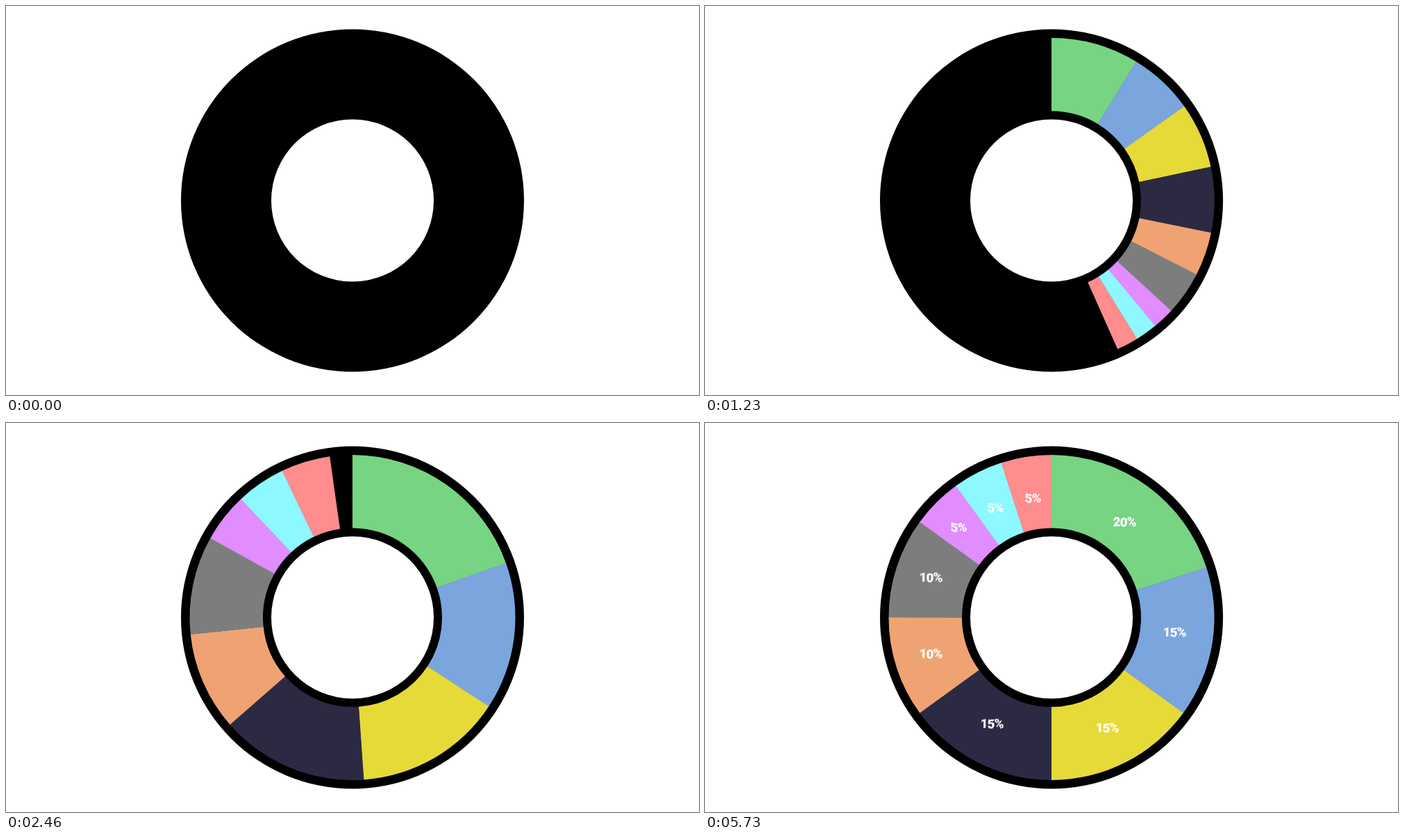
Write an HTML page with a canvas that moves like this. It is 998 px wide and 561 px high and loops after 6330 ms.

```html
<!DOCTYPE html>
<html lang="en">
<head>
<meta charset="utf-8">
<title>Donut chart</title>
<style>
  html, body { margin: 0; width: 100%; height: 100%; overflow: hidden; background: #fff; }
  canvas { display: block; }
</style>
</head>
<body>
<canvas id="stage" width="998" height="561"></canvas>
<script>
const ctx = document.getElementById('stage').getContext('2d');
const LOOP = 6330, STEP = 30, SWEEP = 2700, FADE = 1000;
const CX = 499, CY = 280.5;
const TOP = -Math.PI / 2, TURN = Math.PI * 2;

// share in percent, colour, label centre, start of the label's fade
const slices = [
  [20, '#77d482', 604, 142, 3030],
  [15, '#7ba5dd', 675.5, 300.5, 3230],
  [15, '#e6da38', 579, 439, 3400],
  [15, '#2c2a42', 412.5, 433, 3440],
  [10, '#efa372', 324.5, 332, 3630],
  [10, '#7d7d7d', 324.5, 222, 3750],
  [5, '#e18cff', 365, 150, 4000],
  [5, '#8df8ff', 417.5, 122, 4280],
  [5, '#ff8d8d', 472, 107.5, 4640]
].map(([share, color, x, y, start]) =>
  ({ share, color, x, y, start, label: makeLabel(share + '%') }));

function smooth(t) {
  t = Math.min(1, Math.max(0, t));
  return t * t * (3 - 2 * t);
}

function newLayer() {
  const layer = document.createElement('canvas');
  layer.width = 48;
  layer.height = 28;
  return layer;
}

// White text with a ragged outline: narrow columns shifted by a seeded jitter
function makeLabel(text) {
  const plain = newLayer(), rough = newLayer();
  const p = plain.getContext('2d'), r = rough.getContext('2d');
  p.font = '900 19px Roboto, "Open Sans", sans-serif';
  p.letterSpacing = '-1px';
  p.textAlign = 'center';
  p.fillStyle = '#fff';
  p.fillText(text, 24, 20.5);
  let seed = 7;
  for (let x = 0; x < 48; x += 2) {
    seed = (seed * 73 + 41) % 257;
    r.drawImage(plain, x, 0, 2, 28, x, seed / 257 * 1.6 - 0.8, 2, 28);
  }
  return rough;
}

function ring(outer, inner, from, to, color) {
  ctx.beginPath();
  ctx.arc(CX, CY, outer, from, to);
  ctx.arc(CX, CY, inner, to, from, true);
  ctx.closePath();
  ctx.fillStyle = color;
  ctx.fill();
}

function draw(time) {
  ctx.globalAlpha = 1;
  ctx.fillStyle = '#fff';
  ctx.fillRect(0, 0, 998, 561);
  ring(247, 117, 0, TURN, '#000');

  const sweep = smooth(time / SWEEP) * TURN;
  if (sweep > 0) {
    const end = TOP + sweep;
    let from = TOP;
    for (const s of slices) {
      const to = from + sweep * s.share / 100;
      // a slight overlap hides the seams
      ring(234.5, 129, from, Math.min(to + 0.002, end), s.color);
      from = to;
    }
  }

  for (const s of slices) {
    ctx.globalAlpha = smooth((time - s.start) / FADE);
    if (ctx.globalAlpha > 0) ctx.drawImage(s.label, Math.round(s.x - 24), Math.round(s.y - 14));
  }
}

const origin = performance.now();
function tick() {
  const time = (performance.now() - origin) % LOOP;
  draw(Math.floor(time / STEP) * STEP);
  requestAnimationFrame(tick);
}
tick();
</script>
</body>
</html>
```
